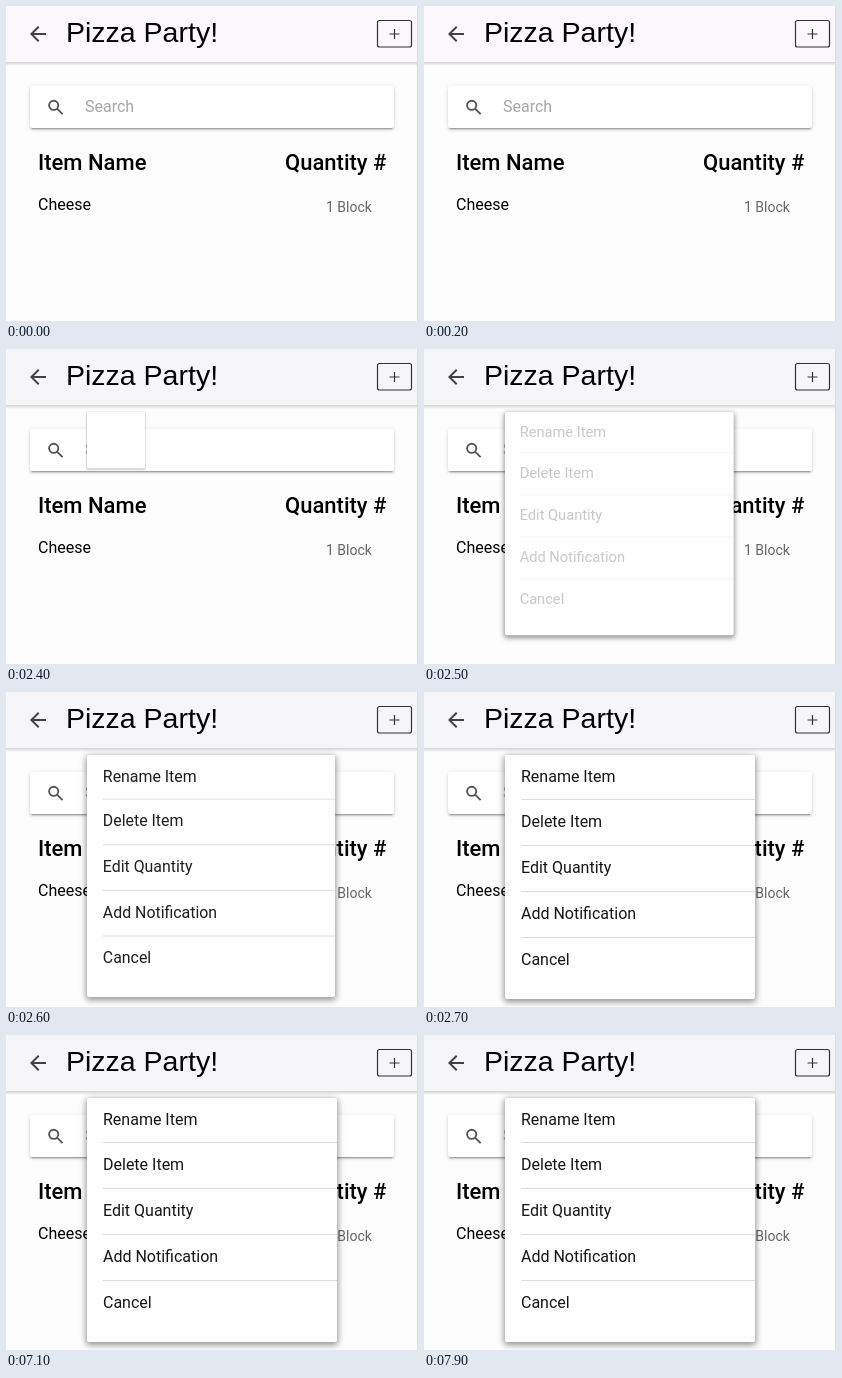
Recreate the animation shown at these times as an HTML page. Size 412 by 315 pixels, loop 8000 ms.

```html
<!DOCTYPE html>
<html lang="en">
<head>
<meta charset="utf-8">
<title>Shopping list menu</title>
<style>
  html, body { margin: 0; width: 100%; height: 100%; overflow: hidden; background: #fefdfe; }
  body { position: relative; font-family: Roboto, sans-serif; }
  #page { position: absolute; left: 0; top: 0; }
  #search {
    position: absolute; left: 24px; top: 80px; width: 364px; height: 42px;
    background: #fff; border-radius: 2px;
    box-shadow: 0 2px 2px rgba(0,0,0,.14), 0 3px 1px -2px rgba(0,0,0,.2), 0 1px 5px rgba(0,0,0,.12);
  }
  .heading { font-size: 22px; font-weight: 500; }
  #menu {
    position: absolute; left: 81px; top: 63px; width: 250px; height: 244px;
    background: #fefefe; border-radius: 2px; transform-origin: 0 0;
    box-shadow: 0 2px 6px 1px rgba(0,0,0,.42);
  }
  #items div {
    box-sizing: border-box; height: 46px; margin-left: 16px;
    font-size: 16px; line-height: 44px; color: #161616;
    border-bottom: 1px solid #dedede;
  }
  #items div:first-child { height: 45px; line-height: 43px; }
  #items div:last-child { border: 0; }
</style>
</head>
<body>
<div id="search"></div>
<svg id="page" width="412" height="315" viewBox="0 0 412 315">
  <defs>
    <linearGradient id="shade" x2="0" y2="1">
      <stop stop-color="#000" stop-opacity=".17"/>
      <stop offset="1" stop-color="#000" stop-opacity="0"/>
    </linearGradient>
  </defs>
  <rect id="header" width="412" height="56"/>
  <rect y="56" width="412" height="4" fill="url(#shade)"/>
  <path d="M411.5 0V315" stroke="#dcdcdf"/>
  <path transform="translate(20 16)" fill="#424242"
    d="M20 11H7.83l5.59-5.59L12 4l-8 8 8 8 1.41-1.41L7.83 13H20z"/>
  <text x="60" y="36" font-family="Liberation Sans, Arial, sans-serif" font-size="28.5">Pizza Party!</text>
  <g fill="none" stroke="#333">
    <rect x="371.5" y="14.5" width="34" height="26.5" rx="2" stroke-width="1.2"/>
    <path d="M383.5 28h10M388.5 23v10" stroke-width="1.2"/>
  </g>
  <g fill="none" stroke="#555" stroke-width="1.9">
    <circle cx="47.7" cy="99.3" r="4.6"/>
    <path d="M51 102.6L56.6 108.2"/>
  </g>
  <text x="79" y="106" font-size="16" fill="#a6a6a6">Search</text>
  <text class="heading" x="32" y="164">Item Name</text>
  <text class="heading" x="279" y="164">Quantity #</text>
  <text x="32" y="204" font-size="16">Cheese</text>
  <text x="320" y="205.5" font-size="14" fill="#666">1 Block</text>
</svg>
<div id="menu"><div id="items">
  <div>Rename Item</div>
  <div>Delete Item</div>
  <div>Edit Quantity</div>
  <div>Add Notification</div>
  <div>Cancel</div>
</div></div>
<script>
const LOOP = 8000, OPEN_AT = 2368, OPEN_FOR = 300;
const header = document.getElementById('header');
const menu = document.getElementById('menu');
const items = document.getElementById('items');
const clamp = v => Math.min(1, Math.max(0, v));

// One coordinate of a cubic bezier running from 0 to 1.
const bezier = (a, b, s) => 3 * a * s * (1 - s) ** 2 + 3 * b * s * s * (1 - s) + s ** 3;

// cubic-bezier(.36, .66, .04, 1), solved by bisection
function ease(x) {
  if (x <= 0 || x >= 1) return clamp(x);
  let low = 0, high = 1;
  for (let i = 0; i < 24; i++) {
    const mid = (low + high) / 2;
    if (bezier(.36, .04, mid) < x) low = mid; else high = mid;
  }
  return bezier(.66, 1, low);
}

function draw(now) {
  const time = Math.floor((now % LOOP) / 100) * 100;
  const progress = clamp((time - OPEN_AT) / OPEN_FOR);
  menu.style.visibility = progress > 0 ? 'visible' : 'hidden';
  menu.style.transform = `scale(${ease(progress)})`;
  items.style.opacity = clamp((progress - .34) / .45);
  header.setAttribute('fill', progress > 0 ? '#f6f6f8' : '#faf8fb');
}

const start = performance.now();
function frame() {
  draw(performance.now() - start);
  requestAnimationFrame(frame);
}
frame();
</script>
</body>
</html>
```
